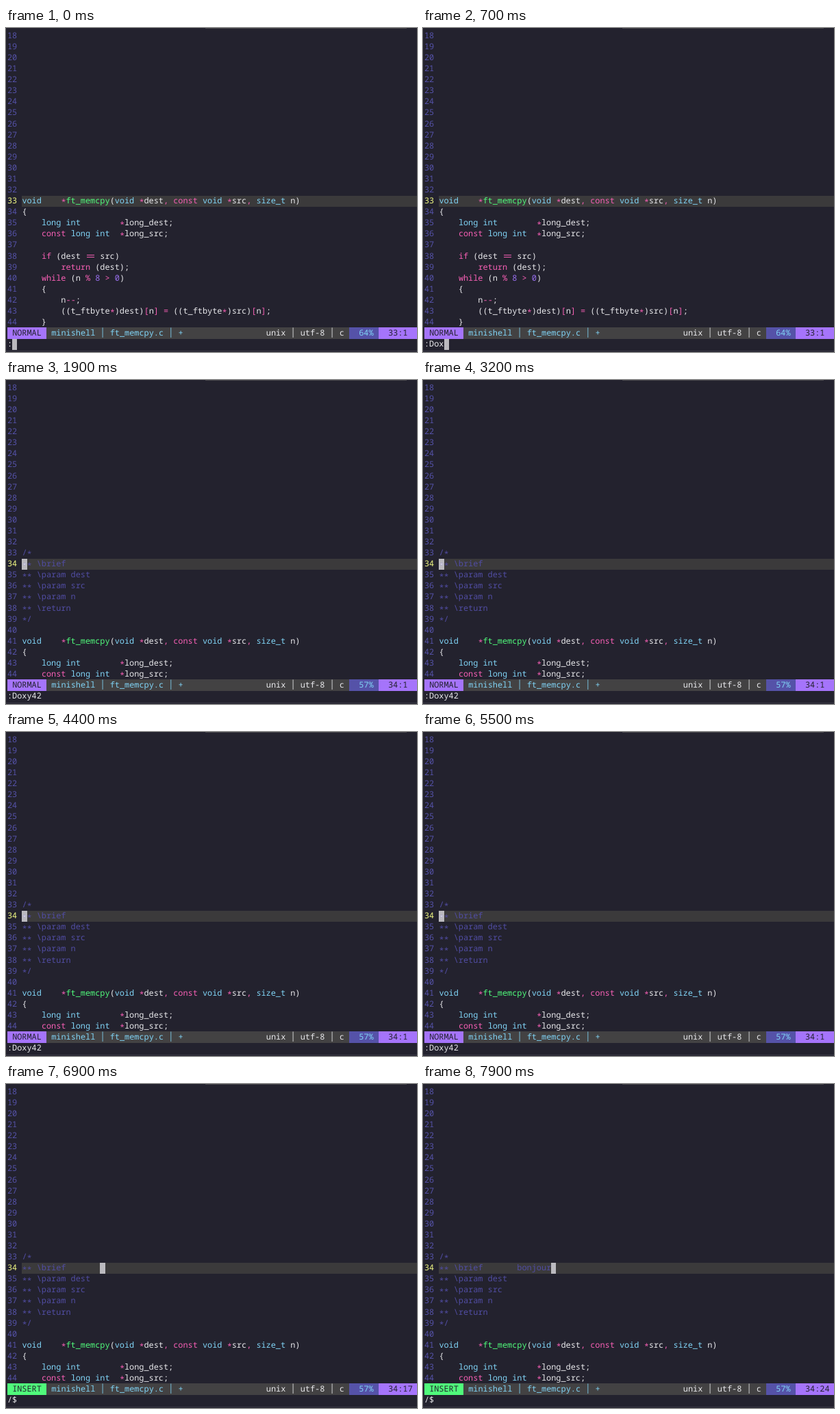
These frames come from a looping animation (600 by 473 pixels, 8000 ms). An HTML page:

```html
<!DOCTYPE html>
<html lang="en">
<head>
<meta charset="utf-8">
<title>Editor session</title>
<style>
  html, body { margin: 0; width: 100%; height: 100%; overflow: hidden; background: #23222e; }
  #stage { position: relative; width: 600px; height: 473px; overflow: hidden; background: #23222e;
    font: 11.88px/16.08px "Noto Sans Mono", "DejaVu Sans Mono", monospace;
    text-rendering: geometricPrecision; font-variant-ligatures: none; color: #e9e9ec; }
  #stage::before, #stage::after { content: ""; position: absolute; height: 1px; }
  #stage::before { top: 0; left: 291px; width: 294px; background: #47464b; }
  #stage::after { top: 471px; left: 0; width: 600px; background: #3a3944; }
  .bar, .txt { position: absolute; white-space: pre; }
  i { font-style: normal; }
  .type { color: #80d4f6; }
  .op { color: #f65fb4; }
  .fn { color: #50fa7b; }
  .digit { color: #9a70f0; }
  .note { color: #514da3; }
  .num { color: #5552a8; }
  .here { color: #f1f984; }
  .dark { color: #23222e; }
  .star { position: relative; top: .2em; }
  .eq { display: inline-block; box-sizing: border-box; width: 11px; height: 4px; margin: 0 1.63px;
    border: solid #f65fb4; border-width: 1px 0; vertical-align: 2px; }
</style>
</head>
<body>
<div id="stage"></div>
<script>
const LOOP = 8000, CELL = 7.128, ROW = 16.08, LEFT = 2, TOP = 3.3;
const FIRST = 18, ROWS = 27, GUTTER = 3;
const STATUS = ROWS, COMMAND = ROWS + 1;
const GREY = '#bbbabf', GREEN = '#50fa7b', PURPLE = '#a574fb';
const stage = document.getElementById('stage');

const blank = Array(15).fill('');
const code = `void    *ft_memcpy(void *dest, const void *src, size_t n)
{
    long int        *long_dest;
    const long int  *long_src;

    if (dest == src)
        return (dest);
    while (n % 8 > 0)
    {
        n--;
        ((t_ftbyte*)dest)[n] = ((t_ftbyte*)src)[n];
    }`.split('\n');
const tags = ['brief', 'param dest', 'param src', 'param n', 'return'];
const header = ['/*', ...tags.map(tag => `** \\${tag}`.padEnd(16)), '*/', ''];

const DOXY_KEYS = [200, 400, 600, 800, 1100, 1300];
const WORD_KEYS = [7000, 7200, 7300, 7500, 7600, 7700, 7900];
const typed = (word, times, t) => word.slice(0, times.filter(at => t >= at).length);

function stateAt(t) {
  const inserted = t >= 1900, searching = t >= 5600, found = t >= 5900, insert = t >= 6700;
  const word = typed('bonjour', WORD_KEYS, t);
  const column = insert ? 17 + word.length : found ? 16 : 1;
  let command = ':' + typed('Doxy42', DOXY_KEYS, t);
  if (searching) command = t >= 5700 ? '/$' : '/';
  return {
    inserted, insert, word, column, command,
    prompt: !inserted || (searching && !found),
    marks: t >= 5700 && t < 6400
  };
}

const span = (cls, text) => `<i class="${cls}">${text}</i>`;
const star = html => html.replace(/\*/g, '<i class="star">*</i>');

function paint(line) {
  if (/^(\/\*|\*)/.test(line)) return span('note', star(line));
  const tokens = /(==)|\b(void|long|int|size_t)\b|(\b(?:const|if|return|while)\b|[*,=%>[\]-])|(ft_memcpy)|\b(\d)\b/g;
  return line.replace(tokens, (m, eq, type, op, fn) =>
    eq ? '<i class="eq"></i>' : type ? span('type', m) : op ? span('op', star(m)) :
    fn ? span('fn', m) : span('digit', m));
}

const bar = (col, row, cells, color) =>
  `<div class="bar" style="left:${LEFT + col * CELL}px;top:${TOP + row * ROW}px;` +
  `width:${cells * CELL}px;height:${ROW}px;background:${color}"></div>`;
const put = (col, row, html, cls = '') =>
  `<div class="txt ${cls}" style="left:${LEFT + col * CELL}px;top:${TOP - .4 + row * ROW}px">${html}</div>`;

function draw(s) {
  const lines = [...blank, ...(s.inserted ? header : []), ...code].slice(0, ROWS);
  const current = s.inserted ? 16 : 15;
  if (s.word) lines[current] += s.word;

  let bars = bar(GUTTER, current, 84, '#3b3a3b');
  let text = '';
  lines.forEach((line, row) => {
    text += put(0, row, FIRST + row, row === current ? 'here' : 'num');
    text += put(GUTTER, row, paint(line));
    if (s.marks) bars += bar(GUTTER + line.length, row, 1, GREEN);
  });

  if (s.prompt) bars += bar(s.command.length, COMMAND, 1, GREY);
  else {
    bars += bar(GUTTER + s.column - 1, current, 1, GREY);
    if (s.column === 1) text += put(GUTTER, current, star('*'));
  }
  text += put(0, COMMAND, s.command);

  bars += bar(0, STATUS, 8, s.insert ? GREEN : PURPLE) + bar(8, STATUS, 62, '#434243') +
    bar(70, STATUS, 6, '#5552a8') + bar(76, STATUS, 9, PURPLE);
  text += put(1, STATUS, s.insert ? 'INSERT' : 'NORMAL', 'dark') +
    put(9, STATUS, 'minishell │ ft_memcpy.c │ +', 'type') +
    put(53, STATUS, 'unix │ utf-8 │ c') +
    put(72, STATUS, s.inserted ? '57%' : '64%', 'type') +
    put(78, STATUS, `${FIRST + current}:${s.column}`, 'dark');
  stage.innerHTML = bars + text;
}

let shown = '';
const start = performance.now();
function tick() {
  const s = stateAt((performance.now() - start) % LOOP);
  const key = JSON.stringify(s);
  if (key !== shown) {
    shown = key;
    draw(s);
  }
  requestAnimationFrame(tick);
}
tick();
</script>
</body>
</html>
```
